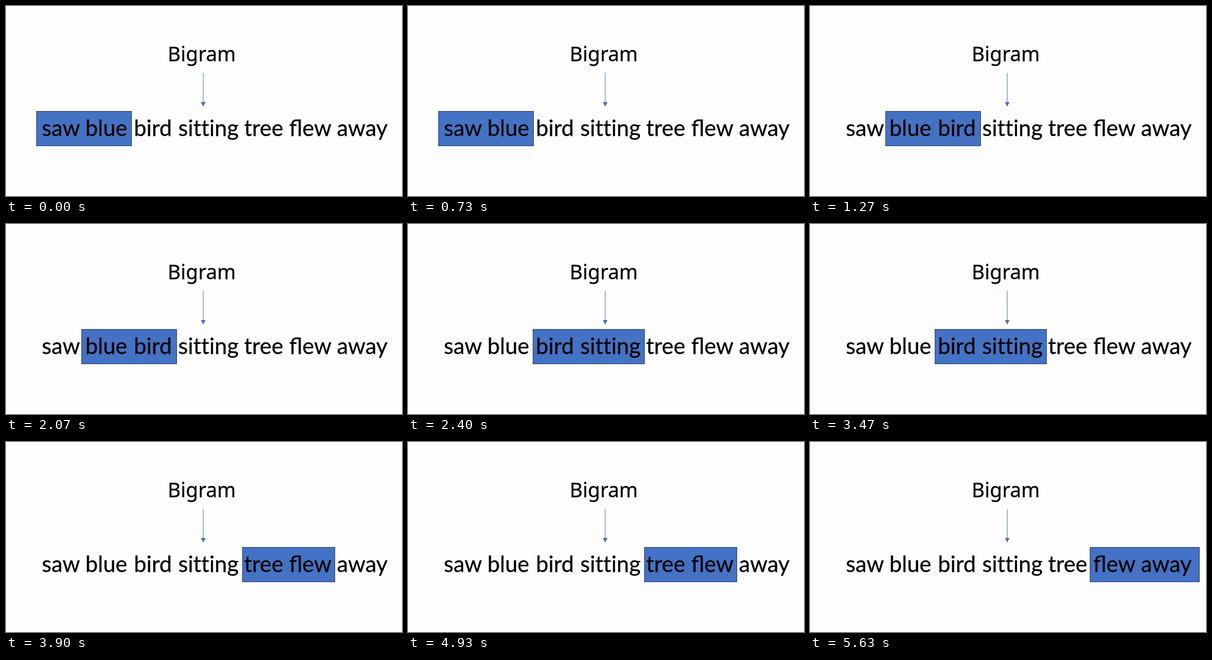
Animation, 746 px wide and 358 px high, one loop 5660 ms. Source, as an HTML page:

```html
<!DOCTYPE html>
<html lang="en">
<head>
<meta charset="utf-8">
<title>Bigram</title>
<style>
  html, body { margin: 0; width: 100%; height: 100%; overflow: hidden; background: #fdfdfd; }
  svg { display: block; width: 746px; height: 358px; }
  text { stroke: #000; stroke-width: .3px; }
  .title { font: 37.7px "Noto Sans", sans-serif; }
  .words { font: 42px Lato, Carlito, sans-serif; }
  .plain { font-variant-ligatures: none; }
  .arrow { fill: #4472c4; }
  .window {
    fill: #4472c4;
    stroke: #1f3864;
    animation: slide 5660ms step-end infinite;
  }
  /* The two-word window jumps along the sentence. */
  @keyframes slide {
    0%     { x: 57.5px;  width: 179px; }
    14.13% { x: 142.5px; width: 179px; }
    39.22% { x: 235.5px; width: 210px; }
    64.31% { x: 445.5px; width: 174px; }
    89.4%, 100% { x: 527.5px; width: 206px; }
  }
</style>
</head>
<body>
<svg viewBox="0 0 746 358">
  <text class="title" x="304.5" y="104">Bigram</text>
  <path class="arrow" d="M371 126h1v55h4l-4.5 8.5l-4.5-8.5h4z"/>
  <rect class="window" x="57.5" y="198.5" width="179" height="65"/>
  <g class="words">
    <text x="67.5" y="245">saw</text>
    <text x="149.5" y="245">blue</text>
    <text x="241" y="245">bird</text>
    <text class="plain" x="324.5" y="245">sitting</text>
    <text x="448.5" y="245">tree</text>
    <text x="533.5" y="245">flew</text>
    <text x="623.5" y="245">away</text>
  </g>
</svg>
</body>
</html>
```
